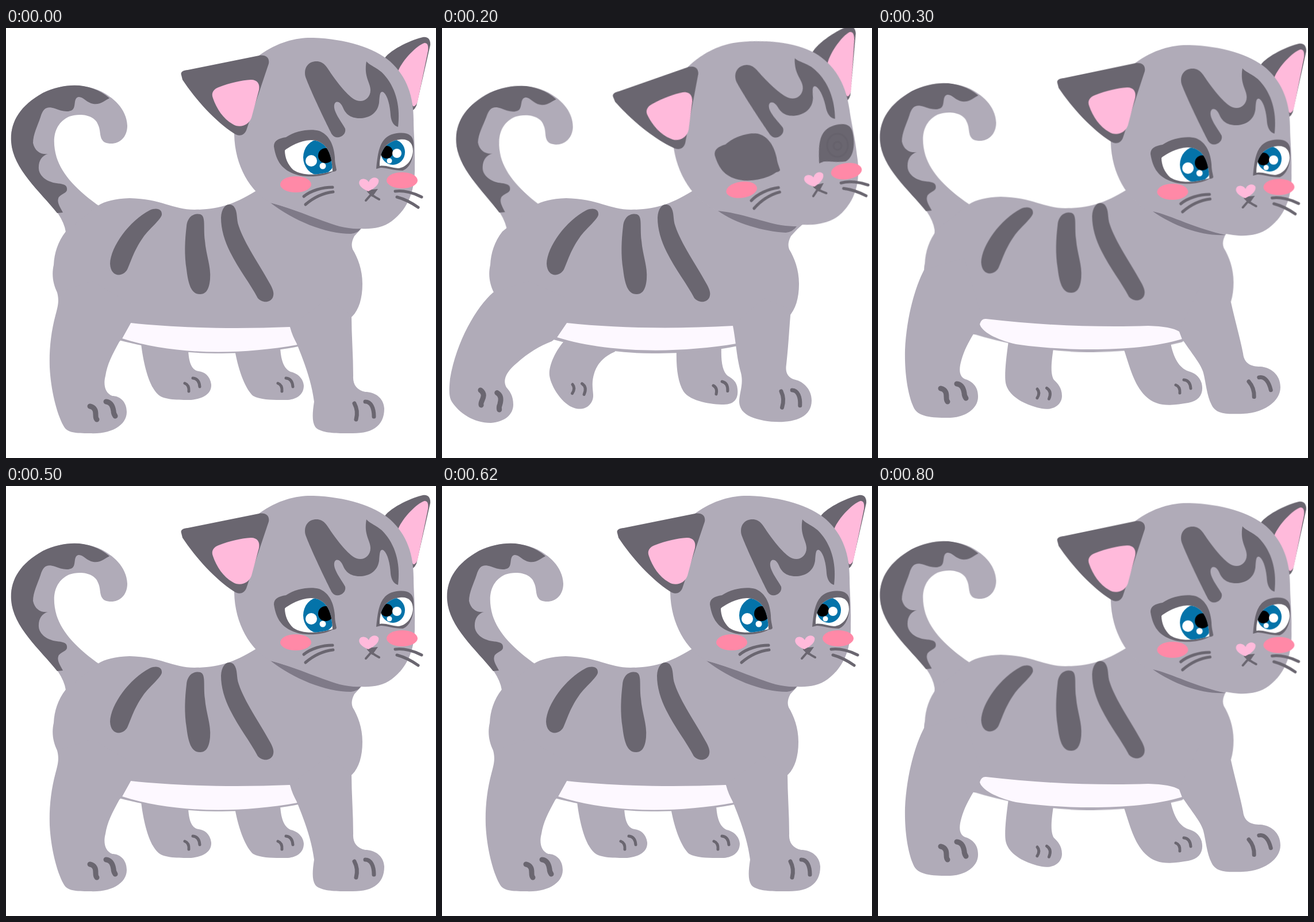
Write an HTML page that moves like this. It is 748 px wide and 748 px high and loops after 1000 ms.

```html
<!DOCTYPE html>
<html lang="en">
<head>
<meta charset="utf-8">
<title>Walking kitten</title>
<style>
  html, body { margin: 0; width: 100%; height: 100%; overflow: hidden; background: #fff; }
  svg { display: block; width: 100vw; height: 100vh; }

  .fur { fill: #b0abb8; }
  .dark { fill: #6a6670; }
  .shade { fill: #7f7a88; }
  .ear { fill: #ffbadb; }
  .cheek { fill: #ff89a7; }
  .belly { fill: #fdf8ff; }
  .white { fill: #fff; }
  .iris { fill: #0473a9; }
  .line { fill: none; stroke: #6a6670; stroke-width: 5; stroke-linecap: round; }
  .toes { fill: none; stroke: #6a6670; stroke-linecap: round; stroke-linejoin: round; }

  /* Two strides per second, three held poses each */
  .stand, .reach, .step, .head, .tail, .torso, .eyes { animation: .5s step-end infinite; }
  .stand { animation-name: stand; }
  .reach { animation-name: reach; }
  .step { animation-name: step; }
  .eyes { animation-name: blink; }
  .head { animation-name: head; transform-origin: 631px 272px; }
  .tail { animation-name: tail; transform-origin: 0 0; }
  .torso { animation-name: torso; }
  .glint { fill: none; stroke: #66626c; stroke-width: 3; animation: glint 1s step-end infinite; }

  @keyframes stand { 0% { visibility: visible } 40%, 100% { visibility: hidden } }
  @keyframes reach { 0% { visibility: hidden } 40% { visibility: visible } 60%, 100% { visibility: hidden } }
  @keyframes step { 0% { visibility: hidden } 60%, 100% { visibility: visible } }
  @keyframes blink { 0% { visibility: visible } 40% { visibility: hidden } 60%, 100% { visibility: visible } }
  @keyframes glint { 0% { visibility: hidden } 20% { visibility: visible } 30%, 100% { visibility: hidden } }
  @keyframes head {
    0% { transform: none }
    40% { transform: translate(16px, -8px) rotate(-7.9deg) }
    60%, 100% { transform: translate(8.5px, 12px) rotate(-.4deg) }
  }
  @keyframes tail {
    0% { transform: none }
    40% { transform: matrix(1, .02, -.04, .995, 23.5, -1) }
    60%, 100% { transform: matrix(1, -.015, 0, 1, -5.5, -2) }
  }
  @keyframes torso {
    0% { transform: none }
    40% { transform: translate(1px, 0) }
    60%, 100% { transform: translate(-1.5px, -2.5px) }
  }
</style>
</head>
<body>
<svg viewBox="0 0 748 748">
  <defs>
    <path id="hindToes" class="toes" stroke-width="9" d="M0 0C10 2 10 10 10 15Q10 21 12 23M28-8C38-7 40 2 41 8Q41 13 44 17"/>
    <path id="foreToes" class="toes" stroke-width="7" d="M0 0Q7 13 3 28M19-3C29-3 34 8 34 23"/>
    <path id="farToes" class="toes" stroke-width="5" d="M0 0Q8 3 7 14M14-9Q25-8 26 6"/>
    <clipPath id="leftEye"><path id="leftWhite" d="M487 211C495 206 510 196 530 195C555 195 567 215 568 249C540 257 515 257 500 247C490 238 485 225 485 213Z"/></clipPath>
    <clipPath id="rightEye"><path id="rightWhite" d="M650 240C650 215 660 197 685 194C700 192 708 200 708 214C707 230 696 243 682 244C670 243 660 238 650 240Z"/></clipPath>
  </defs>

  <!-- Far legs -->
  <g class="fur stand">
    <path d="M235 550C240 590 250 625 265 638C275 647 300 647 322 647C345 645 358 635 357 620C355 605 345 598 335 597C322 595 318 580 317 560Z"/>
    <path d="M398 560C405 600 418 630 430 640C445 648 470 647 490 647C510 645 518 635 518 622C517 608 505 600 495 598C482 592 478 575 477 555Z"/>
    <use href="#farToes" x="311" y="618"/>
    <use href="#farToes" x="473" y="618"/>
  </g>
  <g class="fur reach">
    <path d="M212 545C195 565 185 590 187 605C190 625 210 655 230 661C248 667 264 655 263 638C262 625 260 615 265 600C270 585 280 572 301 563L300 540Z"/>
    <path d="M408 558C407 590 410 615 420 632C432 650 470 655 490 655C508 655 516 645 514 628C513 615 505 610 497 605C488 598 485 580 486 555Z"/>
    <use href="#farToes" transform="translate(227 620) rotate(28)"/>
    <use href="#farToes" transform="translate(472 622) rotate(8)"/>
  </g>
  <g class="fur step">
    <path d="M227 545C222 580 220 605 222 617C226 640 255 656 285 662C305 666 320 655 320 640C320 625 312 618 306 612C300 602 301 585 305 558Z"/>
    <path d="M428 560C438 590 445 620 465 640C485 660 510 657 540 652C560 648 567 635 563 618C559 605 550 600 540 597C525 592 514 575 509 548Z"/>
    <use href="#farToes" transform="translate(277 628) rotate(27)"/>
    <use href="#farToes" x="518" y="621"/>
  </g>

  <g class="tail">
    <path class="fur" d="M164 311C125 284 98 256 88 225C78 190 86 165 110 154C130 147 155 152 160 168C166 180 161 192 172 199C190 206 211 195 211 170C210 140 185 120 165 110C135 96 95 97 64 113C23 136 7 165 9 198C12 245 60 285 90 322Q102 340 104 355V372H150Z"/>
    <path class="dark" d="M180 122C150 97 110 92 64 113C23 136 7 165 9 198C12 245 60 285 89 322L99 321C92 308 88 302 92 294C100 286 107 287 106 279C106 272 96 271 88 270C72 268 58 258 57 245C56 232 62 222 73 219C62 221 50 215 47 200C47 185 55 170 60 155C65 138 72 136 85 140C95 144 108 148 116 142C122 136 117 122 126 120C134 119 140 130 152 132C164 134 172 126 180 122Z"/>
  </g>

  <path class="fur torso" d="M440 280C400 306 370 316 328 316C290 316 270 297 215 296C190 297 172 301 160 309L104 354C90 372 84 392 83 412C79 430 82 445 89 460L165 534C230 554 300 566 365 566C420 566 480 562 530 549L602 502C614 490 620 470 620 445C620 420 612 400 603 385Q599 375 606 362L617 350L650 320L560 290Z"/>

  <!-- Belly and near legs -->
  <g class="fur stand">
    <path class="belly" d="M217 513C300 522 400 524 494 520Q498 536 507 551C400 570 290 568 202 540Z"/>
    <path d="M89 460C93 475 90 485 86 500C78 530 75 560 76 590C78 630 88 670 100 692C106 704 120 705 145 705C185 707 210 690 210 668C210 648 196 640 185 640C172 635 169 620 173 605C176 585 185 568 197 546L202 540L217 513V480L150 440Z"/>
    <path d="M494 519C505 550 530 600 536 650C533 670 532 685 538 694C548 706 580 705 600 705C640 706 658 690 658 662C657 642 640 633 625 633C610 630 603 620 604 605C604 570 601 535 601 500L560 470Z"/>
    <use href="#hindToes" x="146" y="658"/>
    <use href="#foreToes" x="606" y="653"/>
    <path class="shade" d="M460 304C500 314 545 335 580 345Q600 350 617 349Q612 357 600 358C555 358 500 335 460 304Z"/>
  </g>
  <g class="fur reach">
    <path class="belly" d="M217 513C300 522 400 524 507 518L512 549C410 566 290 566 200 538Z"/>
    <path d="M89 460C60 485 25 545 14 610C12 630 12 642 17 650C30 670 55 687 85 687C110 685 124 672 124 655C124 640 118 632 112 625C105 612 112 598 130 583C150 565 170 553 191 545L200 538L217 513V470L150 440Z"/>
    <path d="M506 518C512 550 512 570 520 600C525 620 517 635 517 650C518 670 535 678 560 683C595 689 643 685 643 648C643 628 628 615 615 612C600 608 597 598 599 585C603 550 604 520 607 490L560 470Z"/>
    <use href="#hindToes" transform="translate(67 630) rotate(25)"/>
    <use href="#foreToes" transform="translate(590 632) rotate(3)"/>
  </g>
  <g class="fur step">
    <path class="belly" d="M177 515Q180 505 188 506C280 517 380 521 470 518Q510 519 524 528L529 541C450 565 320 562 240 550C205 542 180 528 177 515Z"/>
    <path d="M80 421C65 450 50 500 47 560C46 600 52 640 63 662C72 678 100 678 125 678C155 677 175 660 174 640C174 622 162 614 152 611C140 606 141 592 145 578C150 560 158 546 165 534L177 515L180 500L150 400Z"/>
    <path d="M529 541C545 565 562 585 566 600C570 615 572 640 580 655C588 672 605 672 635 671C670 670 700 650 700 625C700 602 682 590 665 589C649 589 637 584 635 566C630 540 620 505 614 477L560 450L524 527Z"/>
    <use href="#hindToes" x="109" y="627"/>
    <use href="#foreToes" transform="translate(645 615) rotate(-13)"/>
  </g>

  <g class="dark torso">
    <path d="M181 410C182 380 215 335 250 317C262 312 272 315 271 325C268 335 250 348 238 365C222 388 218 405 211 420C203 434 182 434 181 410Z"/>
    <path d="M314 345C316 325 330 322 338 324C348 328 343 345 346 370C348 395 357 415 355 437C353 458 346 463 337 463C322 463 317 445 314 420C310 395 311 370 314 345Z"/>
    <path d="M374 330C375 308 388 303 396 310C404 320 400 332 405 345C415 375 440 410 458 443C465 455 467 462 464 469C458 480 444 477 438 470C425 445 405 420 390 390C380 370 374 350 374 330Z"/>
  </g>

  <g class="head">
    <path class="dark" d="M657 55C665 40 700 22 725 16C735 14 739 22 738 30L714 135Q712 140 708 143Z"/>
    <path class="ear" d="M682 75C690 55 715 30 728 26C734 26 735 32 734 40L716 128Q712 138 708 136Z"/>
    <path class="fur" d="M440 48C475 22 510 16 535 17C590 19 640 34 668 58C698 85 709 120 709 160C709 185 712 210 711 240C712 278 702 313 671 336C655 348 635 350 618 349C570 345 520 320 460 304C425 285 398 240 397 185C395 130 410 75 440 48Z"/>
    <path class="dark" d="M305 82C303 76 308 74 316 73L440 48C452 46 459 52 457 62L418 178C414 188 404 189 396 183C365 163 330 125 307 90Z"/>
    <path class="ear" d="M360 122C356 112 362 106 370 103C390 95 410 91 426 90C438 90 442 98 440 108L427 156C422 170 406 175 394 167C378 158 366 140 360 122Z"/>
    <path class="dark" d="M521 85C517 68 527 58 540 58C553 58 558 68 566 80C580 100 598 122 610 126C622 130 634 122 634 108C634 95 622 85 627 58C633 66 650 70 660 84C680 108 686 140 682 172C674 170 670 162 669 152C668 135 664 118 657 112C650 108 650 118 649 130C646 150 630 157 615 157C598 157 590 148 586 138C581 126 572 126 571 134C569 146 585 165 590 175C593 188 574 196 567 185C560 172 530 110 521 85Z"/>

    <path class="dark" d="M466 206C466 196 474 192 487 190C505 178 530 175 545 179C560 185 570 200 572 225C572 235 574 240 575 247Q574 250 568 250C550 260 520 260 505 255C480 247 470 232 466 206Z"/>
    <path class="dark" d="M644 245C647 215 650 190 675 184C695 180 708 184 709 200C711 230 700 245 690 248C675 248 660 243 652 243Z"/>
    <g class="eyes">
      <use class="white" href="#leftWhite"/>
      <g clip-path="url(#leftEye)">
        <ellipse class="iris" cx="545" cy="225" rx="28" ry="31"/>
        <circle cx="556" cy="222" r="13"/>
        <circle class="white" cx="531" cy="231" r="10"/>
        <circle class="white" cx="551" cy="240" r="5.5"/>
      </g>
      <use class="white" href="#rightWhite"/>
      <g clip-path="url(#rightEye)">
        <ellipse class="iris" cx="673" cy="216" rx="21" ry="22"/>
        <circle cx="662" cy="216" r="11"/>
        <circle class="white" cx="680" cy="218" r="8"/>
        <circle class="white" cx="667" cy="231" r="4.5"/>
      </g>
    </g>

    <ellipse class="cheek" cx="504" cy="272" rx="27" ry="14"/>
    <ellipse class="cheek" cx="689" cy="265" rx="27" ry="14"/>
    <path class="line" d="M518 293C530 283 550 277 568 277M521 307C535 295 552 287 569 285M677 284C692 282 710 287 723 294M680 294C695 298 707 305 717 312"/>
    <path class="line" style="stroke-width:4" d="M626 300L640 284M630 284Q637 292 649 298"/>
    <path class="dark" d="M627 282L647 280L637 294Z"/>
    <path class="ear" d="M630 284C618 279 612 272 615 266C618 260 628 262 631 268C634 259 645 258 648 264C650 272 640 280 630 284Z"/>
  </g>

  <path class="shade reach" d="M480 318C520 322 560 338 590 343Q605 345 617 345Q610 355 598 356C560 354 510 340 480 318Z"/>
  <path class="shade step" d="M478 319C510 326 555 350 605 360C565 363 515 345 478 319Z"/>
  <g class="glint">
    <ellipse cx="688" cy="204" rx="18" ry="20"/>
    <circle cx="688" cy="205" r="7"/>
  </g>
</svg>
</body>
</html>
```
